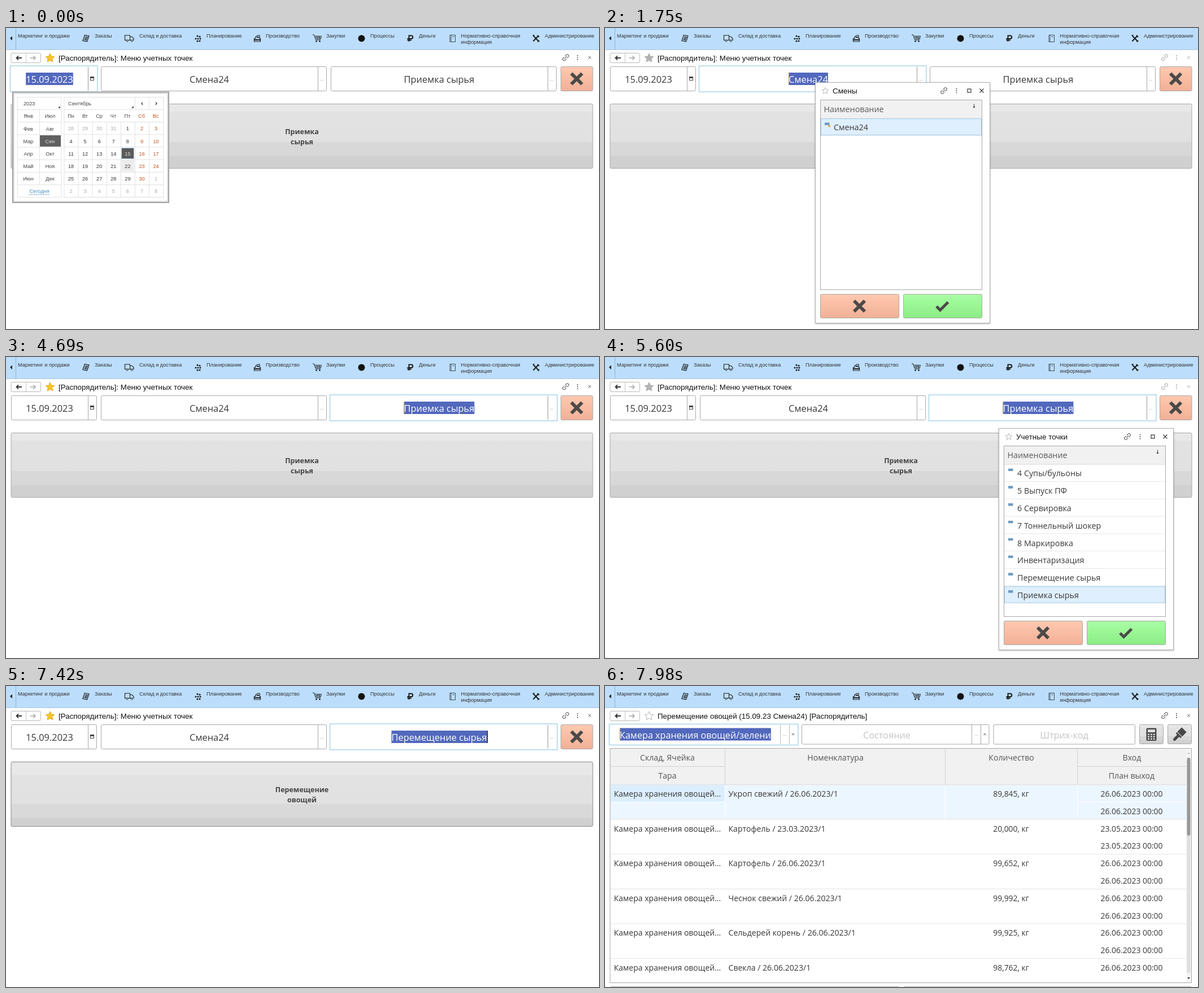
Recreate the animation shown at these times as an HTML page. Size 1050 px wide and 533 px high, loop 8 s.

```html
<!DOCTYPE html>
<html lang="ru">
<head>
<meta charset="utf-8">
<style>
html, body { margin: 0; width: 100%; height: 100%; overflow: hidden; background: #fff }
svg { display: block; width: 100%; height: 100% }
.a { font-family: "Liberation Sans", Arial, sans-serif }
.o { font-family: "Open Sans", "Noto Sans", sans-serif }
.m { text-anchor: middle }
.b { font-weight: 700 }
</style>
</head>
<body>
<svg viewBox="0 0 1050 533">
<defs>
  <linearGradient id="gray" x2="0" y2="1">
    <stop offset=".12" stop-color="#e8e8e8"/><stop offset=".12" stop-color="#e2e2e2"/>
    <stop offset=".59" stop-color="#e1e1e1"/><stop offset=".59" stop-color="#d8d8d8"/>
    <stop offset=".81" stop-color="#d7d7d7"/><stop offset=".81" stop-color="#d0d0d0"/>
  </linearGradient>
  <linearGradient id="grayHover" x2="0" y2="1">
    <stop offset=".21" stop-color="#e8e8e8"/><stop offset=".21" stop-color="#e2e2e2"/>
    <stop offset=".65" stop-color="#e1e1e1"/><stop offset=".65" stop-color="#d9d9d9"/>
    <stop offset=".87" stop-color="#d9d9d9"/><stop offset=".87" stop-color="#d0d0d0"/>
  </linearGradient>
  <linearGradient id="red" x2="0" y2="1"><stop stop-color="#ffc9b0"/><stop offset="1" stop-color="#f1b096"/></linearGradient>
  <linearGradient id="green" x2="0" y2="1"><stop stop-color="#a9ffa5"/><stop offset="1" stop-color="#8bec85"/></linearGradient>
  <filter id="shadow" x="-5%" y="-5%" width="110%" height="110%"><feDropShadow dx="0" dy="1" stdDeviation="1.5" flood-opacity=".3"/></filter>
  <clipPath id="sheet"><rect x="9" y="111" width="1030" height="414"/></clipPath>
</defs>
<g id="static"></g>
<g id="scene"></g>
</svg>
<script>
const LOOP = 8000, STEP = 70;
const INK = '#383838', LINE = '#a8a8a8', BLUE = '#5268bd';
const pen = document.createElement('canvas').getContext('2d');
const widthOf = (s, size) => (pen.font = `${size}px "Open Sans", "Noto Sans", sans-serif`, pen.measureText(s).width);

const text = (x, y, s, size, fill = INK, cls = 'o') =>
  `<text x="${x}" y="${y}" font-size="${size}" fill="${fill}" class="${cls}">${s}</text>`;
// Rectangle given by its left, top, right and bottom edges
const box = (l, t, r, b, fill, stroke = 'none', rx = 0, w = 1) =>
  `<rect x="${l}" y="${t}" width="${r - l}" height="${b - t}" fill="${fill}" stroke="${stroke}" rx="${rx}" stroke-width="${w}"/>`;
const path = (d, stroke = '#222', w = 1, fill = 'none') =>
  `<path d="${d}" stroke="${stroke}" stroke-width="${w}" fill="${fill}"/>`;
const dot = (x, y, r, fill) => `<circle cx="${x}" cy="${y}" r="${r}" fill="${fill}"/>`;
const group = (alpha, s) => alpha > 0 ? `<g opacity="${alpha}">${s}</g>` : '';
const at = (x, y, s) => `<g transform="translate(${x} ${y})">${s}</g>`;

const cross = (x, y, r = 9.5, w = 6, c = '#4a4a48') =>
  path(`M${x - r} ${y - r}L${x + r} ${y + r}M${x + r} ${y - r}L${x - r} ${y + r}`, c, w);
const star = (x, y, r, fill, stroke) => {
  let d = '';
  for (let i = 0; i < 10; i++) {
    const a = i * Math.PI / 5, k = i % 2 ? r * .48 : r;
    d += (i ? 'L' : 'M') + (x + k * Math.sin(a)).toFixed(2) + ' ' + (y - k * Math.cos(a)).toFixed(2);
  }
  return path(d + 'Z', stroke, 1, fill);
};
const link = (x, y, c) => `<g transform="translate(${x} ${y}) rotate(-45)" fill="none" stroke="${c}">
  <path d="M-1 -2.5H-4a2.5 2.5 0 0 0 0 5H-1M1 -2.5H4a2.5 2.5 0 0 1 0 5H1M-3 0H3"/></g>`;
const dots = (x, y, c) => [-3.5, 0, 3.5].map(d => dot(x, y + d, 1, c)).join('');

function menu() {
  const items = [[21, 'Маркетинг и продажи'], [157, 'Заказы'], [236, 'Склад и доставка'], [355, 'Планирование'],
    [460, 'Производство'], [567, 'Закупки'], [645, 'Процессы'], [731, 'Деньги'],
    [805.5, 'Нормативно-справочная'], [954, 'Администрирование']];
  const k = '#1c1c1c';
  return box(0, 0, 1050, 38, '#bcdefc') + path('M0 38.5H1050', '#a9c6e0') + path('M17.5 0V38', '#8fb2d2') +
    path('M11 14.5V22L7 18.2Z', 'none', 0, k) +
    items.map(([x, s]) => text(x, 17, s, 9.2, '#333', 'a')).join('') + text(805.5, 28, 'информация', 9.2, '#333', 'a') +
    path('M139.5 12.5L147 14L143.5 24L136 22.5Z', k, 1.2) + path('M140.5 15.5l4.5 1M139.5 18l4.5 1M138.6 20.3l4.4 1', k, 1.5) +
    path('M213 21.5H210.5V13H219.5V21.5H216M219.5 15.5H223L226 18.5V21.5H224.5M219.5 21.5H221', k, 1.1) +
    `<g fill="none" stroke="${k}"><circle cx="214.5" cy="22.5" r="1.6"/><circle cx="222.8" cy="22.5" r="1.6"/></g>` +
    [[339, 14.3], [336, 19], [340, 19], [344, 19], [339, 23.3], [343, 15.2], [343, 23]].map(([x, y]) => dot(x, y, 1.5, k)).join('') +
    path('M439.5 24V18.5H442V15.5L446 13H449V18.5H450.5V24Z', k, 1.2) + path('M440 21H450M444 16.5H448', k, 2) +
    path('M543 12H545.5L548.5 21H556.5L558.5 14.5H546.5M547.5 17.5H557.5M551 14.5V21M554.5 14.5V21', k, 1) +
    dot(549.5, 23.6, 1.4, k) + dot(555.5, 23.6, 1.4, k) +
    dot(629.5, 18.5, 6, '#111') +
    path('M713.5 24V13.5H717.5a2.8 2.8 0 0 1 0 5.6H710.5M710.5 21.6H718', k, 2) +
    path('M786 12.5H795.5V24.5H786ZM788 12.5V24.5M790.5 15.5H793.5', '#3b4a58', 1) +
    path('M934 14L943 23.5M943 13.5L933.5 23.5', k, 2) + path('M932.5 13.5l3-1M941.5 24.5l3 -2M941 13l3 3', k, 1.8);
}

function head(title, fill, edge, c) {
  return box(9, 44.5, 61.5, 61.5, '#fff', '#b8b8b8', 2) + path('M35.5 45V61', '#c8c8c8') +
    path('M28 53H19M22 49.5L18.5 53L22 56.5', '#333', 1.8) + path('M42.5 53H51.5M48.5 49.5L52 53L48.5 56.5', '#aaa', 1.6) +
    star(78, 53.3, 8.2, fill, edge) + text(93, 57.5, title, 13.4, '#111', 'a') +
    link(991, 52.3, c) + dots(1012, 52.5, c) + cross(1033.5, 52.3, 2.3, 1, c);
}

const button = (l, t, r, b, fill, edge = LINE) =>
  box(l + .5, t + .5, r - .5, b - .5, `url(#${fill})`, edge, 2);

const selected = (x, y, s, size, caret) => {
  const w = widthOf(s, size), l = x - w / 2, r = x + w / 2;
  return box(l, y - 18, r, y + 4, BLUE) + text(x, y, s, size, '#fff', 'o m') +
    (caret == 'end' ? box(r, y - 18, r + 1.5, y + 4, '#111') : caret ? box(l, y - 18, l + 1, y + 4, '#c09a62') : '');
};

// Input field: plain face plus a focused face on top
function field(l, r, cut, x, s, focus, caret, hover) {
  const mark = cut == 145
    ? box(149.5, 86.5, 155.5, 92.5, '#fff', '#444') + box(149, 86, 156, 89, '#444')
    : text(cut + 7.5, 93, '...', 8, '#777', 'a m');
  const part = (edge) => path(`M${cut + .5} 69V111`, edge) + mark;
  return box(l + .5, 68.5, r - .5, 111.5, '#fff', LINE, 2) +
    (hover ? box(cut + 1, 69, r - 1, 111, '#e9e9e9') : '') + part(LINE) + text(x, 97, s, 16.4, INK, 'o m') +
    group(focus, box(l - 1.5, 67, r + 1, 113, '#fff', '#b0d8ea', 0, 1.6) + part('#999') + selected(x, 97, s, 16.4, caret));
}

function calendar(hover) {
  const small = (x, y, s, c = '#444') => text(x, y + 3.3, s, 9.2, c, 'a m'), grid = '#e2e2e2', row = 22.2;
  let s = box(12, 113.5, 288, 309, '#fff', '#a2a2a2', 0, 2) + box(14, 115.5, 286, 307, 'none', '#c4c4c4') +
    box(20.5, 122.5, 98, 299.5, '#fff', grid) + box(103, 122.5, 278.5, 299.5, '#fff', grid) +
    text(31, 137, '2023', 9.2, '#444', 'a') + text(110, 137, 'Сентябрь', 9.2, '#444', 'a') +
    path('M96 138V142H92ZM226 138V142H222Z', 'none', 0, '#555') +
    path('M242 131.5L240 133.7L242 136M265 131.5L267 133.7L265 136', '#333', 1.2) +
    path('M59.5 144V277M228.5 122V144M253.5 122V144M103 144.5H278', grid);
  for (let i = 0; i < 7; i++) s += path(`M20 ${144.5 + i * row}H98M103 ${166.5 + i * row}H278` + (i ? `M${103 + i * 25.1} 166V299` : ''), grid);
  s += box(60, 190, 97, 210, '#5f5f5f') + (hover ? box(204, 234, 227, 254, '#ececec') : '') +
    box(204.5, 212.5, 226.5, 231.5, '#5a5a5a', '#b9d2e2');
  'Янв Фев Мар Апр Май Июн Июл Авг Сен Окт Ноя Дек'.split(' ').forEach((m, i) =>
    s += small(i < 6 ? 39.5 : 78, 156 + i % 6 * row, m, i == 8 ? '#ddd' : '#444'));
  'Пн Вт Ср Чт Пт Сб Вс'.split(' ').forEach((d, i) => s += small(115 + i * 25, 155.5, d, i > 4 ? '#c2541c' : '#444'));
  for (let i = 0; i < 42; i++) {
    const n = i - 3, out = n < 1 || n > 30, day = n < 1 ? n + 31 : n > 30 ? n - 30 : n;
    s += small(115 + i % 7 * 25.1, 178 + (i / 7 | 0) * row, day, out ? '#a8a8a8' : n == 15 ? '#ddd' : i % 7 > 4 ? '#c2541c' : '#333');
  }
  return s + small(59, 289, 'Сегодня', '#4a90c0') + `<path d="M41 295H77" stroke="#4a90c0" stroke-dasharray="2 1"/>`;
}

function dialog(x, y, h, title, rows, pick, hover, badge) {
  const low = h - 52, c = '#555';
  let s = `<g filter="url(#shadow)">${box(.5, .5, 309.5, h - .5, '#fff', '#b0b0b0')}</g>` +
    star(18, 15.3, 6, '#fff', '#b5b5b5') + text(31, 19.8, title, 13.5, '#111', 'a') +
    link(228, 15, c) + dots(250.5, 15, c) + box(270, 12, 276, 18, 'none', '#333', 0, 1.2) + cross(295, 15, 3.5, 1.1, '#333') +
    box(9.5, 31.5, 295.5, h - 59.5, '#fff', LINE) + box(10, 32, 295, 63.5, '#f1f1f1') + path('M10 64H295', '#d4d4d4') +
    text(15.5, 53, 'Наименование', 14.3, '#5a5a5a') + path('M281.5 38.5V45M279.7 43L281.5 45.3L283.3 43', '#333');
  rows.forEach((name, i) => {
    const top = 64 + i * 30.8;
    s += path(`M10 ${top + 30.5}H295`, '#e8e8e8');
    if (i == pick) s += box(10.5, top + .8, 294.5, top + 29.3, '#dfeffd', '#a3cdee');
    s += box(17.5, top + 8, 25, top + 11.5, '#6d9dc6', '#4c7ca6', 0, .6) + (badge ? dot(25, top + 13.5, 2, '#e0a83c') : '') +
      text(33, top + 21.3, name, 14.3);
  });
  return at(x, y, s + button(9, low, 149, low + 43, 'red') + cross(78.5, low + 21.5) +
    button(156, low, 296, low + 43, 'green', hover ? '#5f8f5c' : LINE) + path(`M215 ${low + 22}l6.5 6.5l14 -14`, '#4a4a48', 5));
}

function stockForm() {
  const c = '#555', hd = (x, y, s) => text(x, y, s, 14.1, '#555', 'o m');
  let s = head('Перемещение овощей (15.09.23 Смена24) [Распорядитель]', '#fff', '#b5b5b5', c);
  s += box(7.5, 67.5, 342, 104.5, '#fff', '#b0d8ea', 0, 1.6) + path('M310.5 69V103M326.5 69V103', '#bbb') +
    selected(160, 92.5, 'Камера хранения овощей/зелени', 16.2, 'start') + text(318, 88, '...', 8, '#777', 'a m') + cross(333, 85.5, 1.8, 1, c) +
    box(348.5, 68.5, 680, 103, '#fff', LINE, 2) + path('M649.5 69V103M665.5 69V103', LINE) +
    text(657.5, 88, '...', 8, '#777', 'a m') + cross(672.5, 85.5, 1.8, 1, c) + text(499, 92.5, 'Состояние', 16.3, '#c4c4c4', 'o m') +
    box(688, 68.5, 938.5, 103, '#fff', LINE, 2) + text(813, 92.5, 'Штрих-код', 16.3, '#c4c4c4', 'o m') +
    button(946, 68, 989, 103, 'gray') + button(996, 68, 1039, 103, 'gray') +
    box(958.5, 74.5, 976.5, 97, '#484848', 'none', 2) + box(961, 77, 974, 82, '#ddd');
  for (let i = 0; i < 9; i++) s += box(961 + i % 3 * 4.8, 84.5 + (i / 3 | 0) * 4, 964 + i % 3 * 4.8, 87 + (i / 3 | 0) * 4, '#ddd');
  s += `<g transform="translate(1017 86) rotate(45)" fill="#484848"><path d="M-6 -12H6V-1H-6ZM-6 0H6V3H2.5V12a2.5 2.5 0 0 1 -5 0V3H-6Z"/></g>`;
  s += box(9, 111, 1029, 175, '#f1f1f1') + path('M9 142.5H212M836 142.5H1029M9 175H1029M212.5 111V175M602.5 111V175M836.5 111V175', '#d2d2d2') +
    hd(110.5, 132, 'Склад, Ячейка') + hd(110.5, 164, 'Тара') + hd(408, 132, 'Номенклатура') + hd(719.5, 132, 'Количество') +
    hd(933, 132, 'Вход') + hd(932.5, 164, 'План выход') +
    box(9, 175.5, 1029, 236, '#ecf6ff') + box(9, 175.5, 212, 205, '#dceefe') +
    path('M212.5 176V236M602.5 176V236M836.5 176V236M9 205.5H212M836 205.5H1029', '#fff');
  const rows = [['Укроп свежий / 26.06', '89,845'], ['Картофель / 23.03', '20,000', '23.05'], ['Картофель / 26.06', '99,652'],
    ['Чеснок свежий / 26.06', '99,992'], ['Сельдерей корень / 26.06', '99,925'], ['Свекла / 26.06', '98,762']];
  s += `<g clip-path="url(#sheet)">` + rows.map(([name, n, day = '26.06'], i) => {
    const y = 196 + i * 61.6, date = day + '.2023 00:00';
    return text(15.7, y, 'Камера хранения овощей...', 14.03) + text(218.5, y, name + '.2023/1', 14.1) +
      text(719, y, n + ', кг', 13.9, INK, 'o m') + text(932.5, y, date, 13.9, INK, 'o m') + text(932.5, y + 30.8, date, 13.9, INK, 'o m') +
      path(`M9 ${y + 40.2}H1029`, '#e4e4e4');
  }).join('') + '</g>';
  return s + box(1029, 111, 1038.5, 525, '#f4f4f4') + box(1030.5, 127, 1036.5, 508, '#dedede', 'none', 3) + box(1030.5, 127, 1036.5, 265, '#989898', 'none', 3) +
    path('M1031.5 120L1033.5 117.5L1035.5 120Z', 'none', 0, '#aaa') + path('M1031 516L1033.5 519L1036 516Z', 'none', 0, '#333') +
    box(9, 110.5, 1038.5, 525.5, 'none', LINE) + path('M10 532.5H520M529 532.5H1038', LINE);
}

const POINTS = ['4 Супы/бульоны', '5 Выпуск ПФ', '6 Сервировка', '7 Тоннельный шокер', '8 Маркировка',
  'Инвентаризация', 'Перемещение сырья', 'Приемка сырья'];

function scene(t) {
  if (t >= 7840) return stockForm();
  const within = (a, b) => t >= a && t < b;
  const fade = (first, last) => Math.min(1, Math.max(0, (t - first + STEP) / (last - first + STEP)));
  const dim = within(1540, 3430) || within(4830, 6720), moved = t >= 6650, relabel = t >= 6720;
  const toShift = fade(1260, 1400), toPoint = fade(4550, 4690), toButton = t >= 7490;
  const hot = within(280, 770) || t >= 7140;
  const [top, bottom] = relabel ? ['Перемещение', 'овощей'] : ['Приемка', 'сырья'];
  return head('[Распорядитель]: Меню учетных точек', dim ? '#b4b4b4' : '#f7c52b', dim ? '#a8a8a8' : '#e3ab1e', dim ? '#aaa' : '#555') +
    field(9, 161, 145, 77, '15.09.2023', 1 - toShift, t >= 280 && 'start') +
    field(168, 568, 552, 360, 'Смена24', toShift * (1 - toPoint), 'start', within(1120, 1330)) +
    field(575, 975, 959, 767, moved ? 'Перемещение сырья' : 'Приемка сырья', toButton ? 0 : toPoint, moved ? 'end' : 'start', within(4410, 4620)) +
    button(982, 68, 1039.5, 112, 'red') + cross(1010.5, 90) +
    (toButton ? box(7.5, 132.5, 1040.5, 250.5, 'none', '#b0d8ea', 0, 1.6) : '') +
    button(8.5, 134, 1039.5, 249, hot ? 'grayHover' : 'gray', hot ? '#868686' : LINE) +
    text(524, 187.6, top, 12.5, '#444', 'o m b') + text(524, 205.6, bottom, 12.5, '#444', 'o m b') +
    group(1 - fade(210, 420), calendar(t < 70)) +
    group(fade(1540, 1750) * (1 - fade(3150, 3360)), dialog(372, 96, 427, 'Смены', ['Смена24'], 0, t >= 2870, true)) +
    group(fade(4830, 5040) * (1 - fade(6440, 6650)), dialog(697, 126, 393, 'Учетные точки', POINTS, t < 5670 ? 7 : 6, t >= 6160));
}

document.getElementById('static').innerHTML = menu();
const stage = document.getElementById('scene');
let shown = -1;
function draw() {
  const t = Math.floor(performance.now() % LOOP / STEP) * STEP;
  if (t !== shown) stage.innerHTML = scene(shown = t);
  requestAnimationFrame(draw);
}
draw();
</script>
</body>
</html>
```
